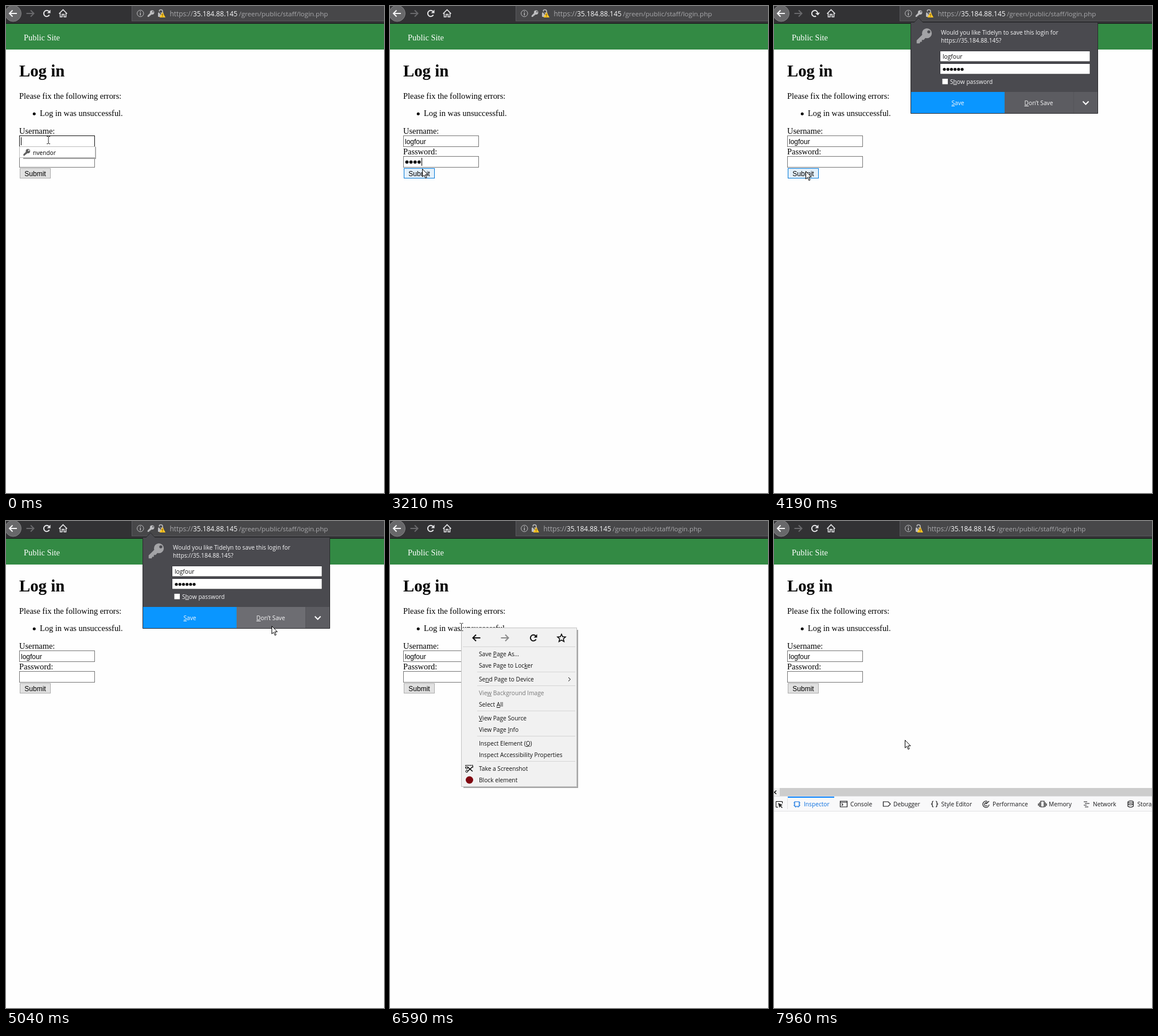
Animation, 659 px wide and 850 px high, one loop 8000 ms. Source, as an HTML page:

```html
<!DOCTYPE html>
<html lang="en">
<head>
<meta charset="utf-8">
<title>Login form</title>
<style>
html, body { margin: 0; width: 100%; height: 100%; overflow: hidden; background: #fefefe; }
svg { display: block; }
text { white-space: pre; }
.page { font: 14.4px "Liberation Serif", serif; }
.form { font: 12px "Liberation Sans", sans-serif; }
.ui { font: 10.2px "Open Sans", "Noto Sans", sans-serif; }
.url { font: 11.9px "Open Sans", "Noto Sans", sans-serif; fill: #a9a9ac; }
.key { text-decoration: underline; }
.line { fill: none; stroke: currentColor; }
.field { fill: #fff; stroke: #767676; }
.field.hot { stroke: #111; }
.button { fill: #e1e1e1; stroke: #adadad; }
.button.hot { fill: #e5f1fb; stroke: #0078d7; }
.button.down { fill: #cce4f7; stroke: #005499; }
#dont { fill: #5c5c61; }
#dont.hot { fill: #6d6d72; }
</style>
</head>
<body>
<svg width="659" height="850" viewBox="0 0 659 850">
  <defs>
    <g id="key">
      <path fill-rule="evenodd" d="M5.7 5.5a4.9 4.9 0 1 0 9.8 0a4.9 4.9 0 1 0-9.8 0M11 4a1.5 1.5 0 1 0 3 0a1.5 1.5 0 1 0-3 0"/>
      <path d="M6.4 6.6L.4 12.6V15.6H3.4L4 14H5.6V12.2H7.4L9.4 9.8Z"/>
    </g>
    <path id="left" class="line" d="M6.5 0H-6.5M-1-5.5L-6.5 0L-1 5.5"/>
    <g id="reload"><path class="line" d="M4.6 2.6A5.2 5.2 0 1 1 4.2-3.1"/><path fill="currentColor" d="M6.5-6.5V-.6H.6Z"/></g>
  </defs>

  <!-- page -->
  <rect width="659" height="850" fill="#fefefe"/>
  <rect y="31" width="659" height="45" fill="#338a44"/>
  <g class="page">
    <text x="31" y="60" fill="#fff">Public Site</text>
    <text x="23" y="122.5" font-size="28.8" font-weight="bold">Log in</text>
    <text x="23" y="161.5">Please fix the following errors:</text>
    <circle cx="49.2" cy="188.3" r="2.5"/>
    <text x="59" y="192">Log in was unsuccessful.</text>
    <text x="23" y="222.5">Username:</text>
    <text x="23" y="258.5">Password:</text>
  </g>
  <g class="form">
    <rect id="userBox" class="field" x="23.5" y="226.5" width="131" height="19"/>
    <text id="user" x="26" y="240.5"></text>
    <rect id="passBox" class="field" x="23.5" y="262.5" width="131" height="19"/>
    <g id="pass"></g>
    <rect id="submit" class="button" x="24.5" y="283.5" width="53" height="17"/>
    <text x="51" y="296.5" text-anchor="middle">Submit</text>
  </g>
  <path id="caret" stroke="#000" d="M.5 0V14"/>
  <g id="saved">
    <path fill="#a0a0a0" d="M30 246H157V267H30Z"/>
    <rect x="23.5" y="245.5" width="132" height="19" fill="#fff" stroke="#bcbcbc"/>
    <use href="#key" transform="translate(30 249) scale(.78)" fill="#606060"/>
    <text class="ui" x="47" y="259.5">nvendor</text>
  </g>

  <!-- browser toolbar -->
  <rect width="659" height="31" fill="#323234"/>
  <rect y="30" width="659" height="1" fill="#18181a"/>
  <rect x="219.5" y="-1" width="445" height="27" fill="#474749" stroke="#5b5b5e"/>
  <circle cx="12.5" cy="13" r="14" fill="#68686a" stroke="#818183"/>
  <g stroke-width="2">
    <use href="#left" x="12.5" y="13" color="#f4f4f5"/>
    <use href="#left" transform="translate(42 13) scale(-1 1)" color="#69696c"/>
    <use id="spin" href="#reload" color="#e4e4e6"/>
    <path class="line" color="#e4e4e6" stroke-width="1.6" d="M92.5 13.5L99.5 6.5L106.5 13.5M94.5 12.5V19H97.8V14.5H101.2V19H104.5V12.5"/>
  </g>
  <g color="#bdbdbf">
    <circle class="line" cx="234.3" cy="13" r="5.7"/>
    <path class="line" stroke-width="1.5" d="M234.3 12V16.5M234.3 9.2V10.8"/>
  </g>
  <use id="smallKey" href="#key" transform="translate(246.5 7) scale(.77)" fill="#bdbdbf"/>
  <g id="place">
    <path class="line" color="#bdbdbf" stroke-width="1.6" d="M267 12V9.5A3 3 0 0 1 273 9.5V12"/>
    <rect x="265" y="11.5" width="9.5" height="7.5" rx="1" fill="#bdbdbf"/>
    <path stroke="#474749" stroke-width="1.4" d="M264 7L275 20"/>
    <path fill="#ffc524" d="M272.8 10.5L278 20H267.6Z"/>
    <path stroke="#4a3a00" d="M272.8 13.5V16.7M272.8 17.7V18.8"/>
    <g class="url">
      <text x="285.5" y="17.7">https://</text>
      <text x="326" y="17.7" fill="#f9f9fa">35.184.88.145</text>
      <text x="406" y="17.7" font-size="11.6">/green/public/staff/login.php</text>
    </g>
  </g>

  <!-- save prompt -->
  <g id="prompt" class="ui" fill="#f9f9fa">
    <path fill="#4a4a4f" stroke="#2a2a2d" d="M238.5 28.5H244.5L252 20.5L259.5 28.5H564.5V187.5H238.5Z"/>
    <use href="#key" transform="translate(248 38) scale(1.75)" fill="#a3a3a6"/>
    <text x="291" y="50">Would you like Tidelyn to save this login for</text>
    <text x="291" y="64">https://35.184.88.145?</text>
    <path fill="#fff" stroke="#38383d" d="M289.5 78.5H551V97H289.5ZM289.5 100.5H551V119H289.5Z"/>
    <text x="294" y="91.5" fill="#0c0c0d">logfour</text>
    <g id="promptDots"></g>
    <rect x="293.5" y="127" width="9.5" height="9.5" fill="#fff"/>
    <text x="307" y="135.5">S<tspan class="key">h</tspan>ow password</text>
    <rect x="239" y="150" width="163" height="37" fill="#0a96ff"/>
    <rect id="dont" x="402" y="150" width="120" height="37"/>
    <rect x="522" y="150" width="42" height="37" fill="#5c5c61"/>
    <path stroke="#55555a" d="M522.5 150V187"/>
    <g text-anchor="middle">
      <text x="320.5" y="173"><tspan class="key">S</tspan>ave</text>
      <text x="461.5" y="173"><tspan class="key">D</tspan>on’t Save</text>
    </g>
    <path class="line" color="#fff" stroke-width="2" d="M538.5 166.5L543.5 171.5L548.5 166.5"/>
  </g>

  <!-- context menu -->
  <g id="menu" class="ui">
    <path fill="#888" opacity=".75" d="M128 190H328V466H128Z"/>
    <rect x="124.5" y="186.5" width="201" height="277" fill="#f1f1f1" stroke="#c4c4c4"/>
    <rect id="row" x="127" width="196" height="20" fill="#91c9f7"/>
    <path stroke="#d5d5d5" d="M127 219.5H323M152 263.5H323M152 287.5H323M152 331.5H323M152 375.5H323M152 419.5H323"/>
    <g stroke-width="2">
      <use href="#left" x="151" y="204" color="#111"/>
      <use href="#left" transform="translate(200 204) scale(-1 1)" color="#8a8a8a"/>
      <use href="#reload" x="250" y="204" color="#111"/>
      <path class="line" stroke-width="1.5" d="M299 197.5L301 202L306 202.4L302.2 205.7L303.4 210.5L299 207.9L294.6 210.5L295.8 205.7L292 202.4L297 202Z"/>
    </g>
    <path class="line" d="M311 273L314.5 276.3L311 279.6"/>
    <path class="line" stroke-width="1.3" stroke-dasharray="2 1" d="M132 431V426.5H144.5V431"/>
    <path class="line" stroke-width="1.5" d="M135 429L144 437M144 429L135 437"/>
    <circle class="line" cx="133.8" cy="437" r="1.8"/><circle class="line" cx="133.8" cy="431" r="1.8"/>
    <circle cx="138.5" cy="452" r="6.5" fill="#800610"/>
    <g id="items"></g>
  </g>

  <!-- developer tools -->
  <g id="tools" class="ui">
    <rect y="466" width="659" height="384" fill="#fefefe"/>
    <rect y="466" width="659" height="14" fill="#cdcdcd"/>
    <rect y="466" width="10" height="14" fill="#f0f0f0"/>
    <path class="line" stroke-width="1.4" d="M4 470.5L.8 473.5L4 476.5"/>
    <rect y="480" width="659" height="27" fill="#f9f9fa"/>
    <path stroke="#e0e0e2" d="M0 480.5H659M0 506.5H659M23.5 484V503"/>
    <rect x="24" y="481" width="81" height="2" fill="#0a84ff"/>
    <path class="line" d="M7 499.5H3.5V489.5H14.5V493"/>
    <path fill="#222" d="M7 492L15 495.5L12 497L15 500L13.8 501L11 498L9.5 500.5Z"/>
    <g id="tabs"></g>
  </g>

  <g id="mouse">
    <path id="arrow" fill="#fff" stroke="#000" stroke-linejoin="round" d="M.5.5V14L3.6 11.2L5.9 16.5L8 15.6L5.7 10.4H10Z"/>
    <path id="beam" class="line" color="#222" d="M-2.5-6.5H-.5L.5-5.5L1.5-6.5H3.5M.5-6V6M-2.5 6.5H-.5L.5 5.5L1.5 6.5H3.5"/>
  </g>
</svg>

<script>
const LOOP = 8000;
const USER = 'logfour';
const $ = id => document.getElementById(id);
const show = (id, on) => { $(id).style.display = on ? '' : 'none'; };
const place = (id, x, y) => $(id).setAttribute('transform', `translate(${x} ${y})`);

// "_" marks the access key that follows it
const items = [
  [232, 'Save _Page As...'], [252, 'Save Page to Loc_ker'], [276, 'Se_nd Page to Device'],
  [300, 'Vie_w Background Image', '#777'], [320, 'Select _All'], [344, '_View Page Source'],
  [364, 'View Page _Info'], [388, 'Inspect Element (_Q)'],
  [408, 'Inspect Accessibility Properties'], [432, 'Take a Screenshot'], [452, 'Block element']
];
$('items').innerHTML = items.map(([y, label, fill = '#111']) =>
  `<text x="155" y="${y + 4}" fill="${fill}">${label.replace(/_(.)/, '<tspan class="key">$1</tspan>')}</text>`
).join('');

// label position, label, icon position, icon path around y = 0
const tabs = [
  [52, 'Inspector', 34, 'M2-4H10V4H2ZM0-2H2M10-2H12M0 2H2M10 2H12M4 4V6M8 4V6'],
  [133, 'Console', 115, 'M.5-5H12.5V5H.5ZM.5-3H12.5M3-1L5 1L3 3'],
  [208, 'Debugger', 190, 'M.5-4H9L13 0L9 4H.5Z'],
  [291.5, 'Style Editor', 274, 'M4-5Q2-5 2-3V-1L.5 0L2 1V3Q2 5 4 5M8-5Q10-5 10-3V-1L11.5 0L10 1V3Q10 5 8 5'],
  [381, 'Performance', 363, 'M9-4.5A5.5 5.5 0 1 0 12 1M9-1A2.8 2.8 0 1 0 9 2M6 0L12-5'],
  [479, 'Memory', 461, 'M4-5H10V5H4ZM2-3V5M12-3V5M0-1V3M14-1V3'],
  [556, 'Network', 539, 'M1-4H7M3-1H11M1 2H6M3 5H9'],
  [633.5, 'Storage', 616, 'M1-3.5A4.7 1.8 0 1 1 10.4-3.5A4.7 1.8 0 1 1 1-3.5V4Q5.7 7 10.4 4V-3.5M1 0Q5.7 3 10.4 0']
];
$('tabs').innerHTML = tabs.map(([x, label, ix, d], i) => {
  const ink = i ? '#18181a' : '#0a6fe0';
  return `<path class="line" color="${ink}" stroke-width="1.2" transform="translate(${ix} 494)" d="${d}"/>` +
    `<text x="${x}" y="498" fill="${ink}">${label}</text>`;
}).join('');

const dots = (n, x, y, gap, r) => Array.from({ length: n }, (_, i) =>
  `<circle cx="${x + i * gap}" cy="${y}" r="${r}" fill="#0c0c0d"/>`).join('');

// each step changes part of the state and holds until the next
const start = {
  at: [73.5, 234], beam: 1, focus: 'user', caret: 1, typed: 0, secret: 0, saved: -1,
  down: 0, prompt: 0, busy: 0, keyIcon: 1, menu: 0, tools: 0
};
const steps = [
  [0, { saved: 0 }],
  [270, { saved: -1, typed: 1 }], [430, { typed: 2 }], [570, { typed: 3 }], [710, { typed: 4 }],
  [980, { typed: 5 }], [1110, { typed: 6 }], [1380, { typed: 7 }],
  [1950, { at: [73, 229], caret: 0 }], [2090, { at: [73, 224] }],
  [2380, { at: [70, 255] }], [2520, { at: [66, 271], focus: 'pass', caret: 1, saved: 36 }],
  [2660, { at: [60, 278] }], [2790, { at: [56, 284], beam: 0, saved: -1, secret: 1 }],
  [2930, { secret: 2 }], [3070, { secret: 3 }], [3210, { secret: 4 }],
  [3340, { secret: 5, at: [55, 288] }], [3500, { secret: 6 }],
  [3780, { focus: '', down: 1 }], [3920, { down: 0, prompt: .24, busy: 1 }],
  [4060, { prompt: 1, secret: 0 }], [4340, { at: [100, 280] }], [4480, { at: [200, 250] }],
  [4620, { at: [310, 224] }], [4760, { at: [400, 203] }], [4900, { at: [474, 190] }],
  [5040, { at: [463, 183], busy: 0 }],
  [5310, { prompt: 0, keyIcon: 0 }], [5450, { at: [440, 182] }], [5590, { at: [350, 180] }],
  [5730, { at: [245, 179] }], [5870, { at: [165, 183], beam: 1 }], [6010, { at: [134, 185] }],
  [6150, { at: [124, 185] }],
  [6450, { menu: .6 }], [6590, { menu: 1 }],
  [7140, { at: [145, 226], beam: 0 }], [7270, { at: [188, 304] }], [7410, { at: [219, 361] }],
  [7540, { at: [228, 382] }],
  [7810, { menu: 0 }], [7960, { tools: 1 }]
];
let last = start;
const states = steps.map(([, change]) => last = { ...last, ...change });

function setHot(id, [x, y], allowed = true) {
  const b = $(id).getBBox();
  const hit = x >= b.x && x <= b.x + b.width && y >= b.y && y <= b.y + b.height;
  $(id).classList.toggle('hot', allowed && hit);
}

function draw(s) {
  place('mouse', ...s.at);
  show('arrow', !s.beam);
  show('beam', s.beam);

  $('user').textContent = USER.slice(0, s.typed);
  $('pass').innerHTML = dots(s.secret, 29.5, 272.3, 7.1, 2.9);
  show('caret', s.focus && s.caret);
  if (s.focus === 'user') place('caret', s.typed ? 26 + $('user').getComputedTextLength() : 26, 229);
  else place('caret', Math.round(26 + s.secret * 7.2), 265);
  show('saved', s.saved >= 0);
  place('saved', 0, Math.max(0, s.saved));

  for (const id of ['userBox', 'passBox', 'submit']) setHot(id, s.at, !s.menu);
  $('submit').classList.toggle('down', !!s.down);

  show('prompt', s.prompt);
  if (s.prompt) {
    const fading = s.prompt < 1;
    $('prompt').setAttribute('opacity', s.prompt);
    place('prompt', 0, fading ? -3 : 0);
    $('promptDots').innerHTML = dots(fading ? 8 : 6, 297, 110.5, 6.2, 2.6);
    setHot('dont', s.at);
  }

  $('spin').setAttribute('transform', `translate(71 13) rotate(${s.busy ? 35 : 0})`);
  show('smallKey', s.keyIcon);
  place('place', s.keyIcon ? 0 : -18, 0);

  show('menu', s.menu);
  $('menu').setAttribute('opacity', s.menu);
  const row = items.find(([y, , off]) => !off && Math.abs(y - s.at[1]) <= 10);
  show('row', row && !s.beam);
  if (row) $('row').setAttribute('y', row[0] - 10);
  show('tools', s.tools);
}

let shown = -1;
function tick() {
  const t = performance.now() % LOOP;
  const i = steps.findLastIndex(([time]) => time <= t);
  if (i !== shown) draw(states[shown = i]);
  requestAnimationFrame(tick);
}
tick();
</script>
</body>
</html>
```
